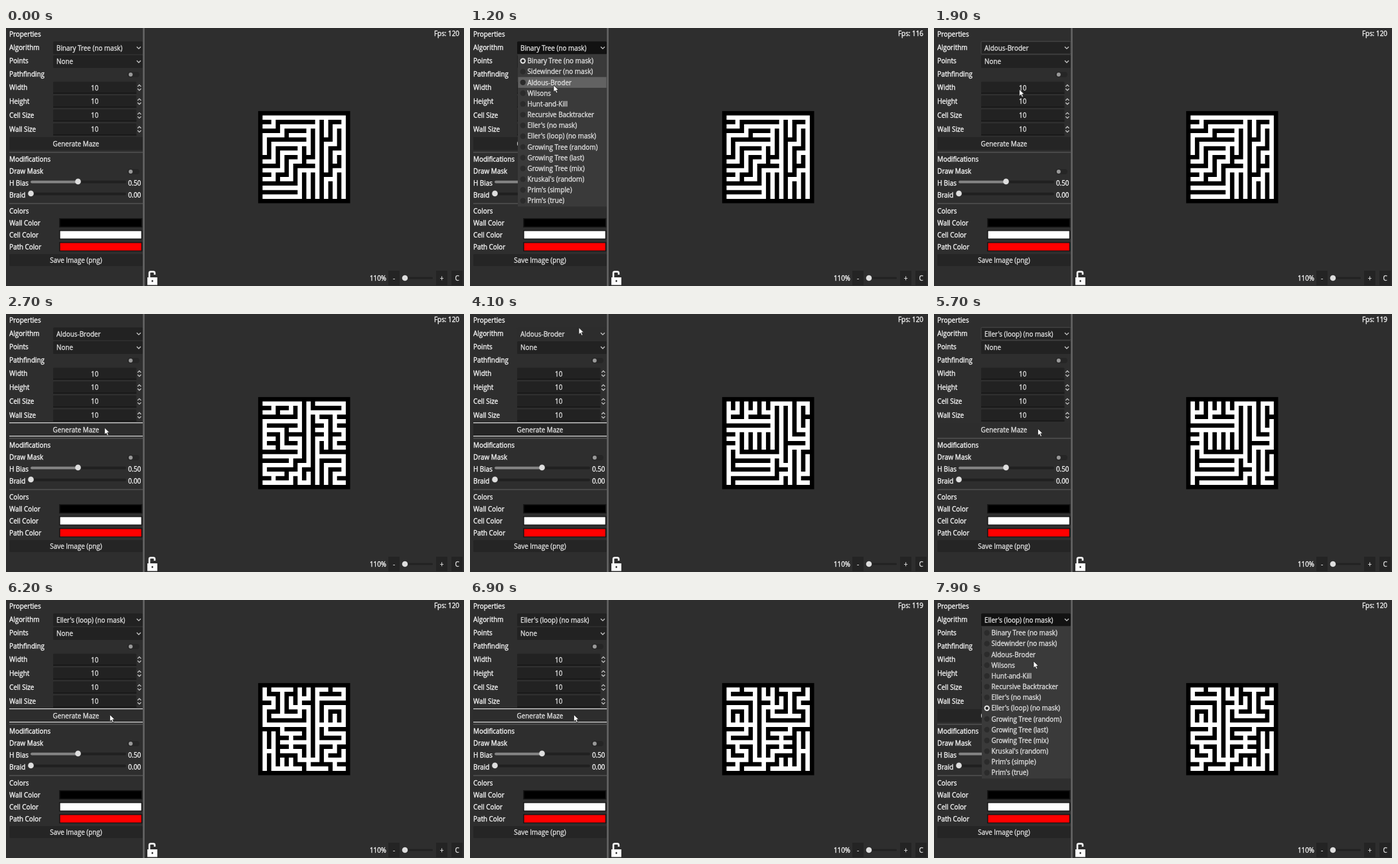
Recreate the animation shown at these times as an HTML page. Size 690 px wide and 388 px high, loop 8 s.

```html
<!DOCTYPE html>
<html lang="en">
<head>
<meta charset="utf-8">
<title>Maze generator</title>
<style>
  html, body { margin: 0; width: 100%; height: 100%; overflow: hidden; background: #2e2e2e; }
  svg { display: block; width: 100vw; height: 100vh; }
  text { font: 400 9.9px "Open Sans", "Noto Sans", sans-serif; fill: #f6f6f6; stroke: #f6f6f6; stroke-width: .35; white-space: pre; }
  .control { fill: #dedede; stroke: #dedede; }
  .line { fill: none; stroke: #c4c4c4; stroke-width: 1.3; }
</style>
</head>
<body>
<svg id="stage" viewBox="0 0 690 388"></svg>
<script>
const stage = document.getElementById('stage');

function add(tag, attrs, parent = stage) {
  const node = document.createElementNS('http://www.w3.org/2000/svg', tag);
  for (const key in attrs) node.setAttribute(key, attrs[key]);
  parent.appendChild(node);
  return node;
}
const rect = (x, y, width, height, fill, parent, more) =>
  add('rect', { x, y, width, height, fill, ...more }, parent);
const dot = (cx, cy, r, fill, parent) => add('circle', { cx, cy, r, fill }, parent);
const path = (d, more, parent) => add('path', { d, ...more }, parent);

// y is the middle of the line of text
function label(x, y, content, anchor = 'start', parent) {
  const node = add('text', { x, y: y + 3.6, 'text-anchor': anchor }, parent);
  node.textContent = content;
  return node;
}
function controlLabel(...args) {
  const node = label(...args);
  node.setAttribute('class', 'control');
  return node;
}
const show = (node, on) => node.setAttribute('visibility', on ? 'visible' : 'hidden');

// Passages in cell coordinates
const mazes = {
  tree: `M0 0H9V9M0 1H1V0M2 1H6V0M7 1V0M8 1H9M0 2H2V1M3 2H5V1M6 2V1M7 2V1M8 2V1
    M0 3V2M1 3H5V2M6 3V2M7 3H8V2M0 4V3M1 4V3M2 4H4V3M5 4V3M6 4V3M7 4V3M8 4H9
    M0 5H1V4M2 5V4M3 5H4V4M5 5H6V4M7 5V4M8 5V4M0 6H2V5M3 6V5M4 6H6V5M7 6V5M8 6H9
    M0 7H1V6M2 7H3V6M4 7V6M5 9V6M6 9V6M7 7H8V6M0 8H4V7M7 9V7M8 9V7M0 9H4V8`,
  walk: `M0 0H4V3M0 1H1V0M2 1H3V0M4 2H0V3H2M5 0V7M6 0H9V1M5 1H9M6 1V2H7V4H6V9M6 3H7
    M8 1V3H9V4M9 2H8M3 3H4M0 3V5H1M0 4H1M2 3V5H4V4H3M9 4H8V5H9M7 4V5
    M0 6H4V5M6 6H9V7H7V9M0 7H3V6M5 7H4V9H5V8M0 7V8H2M4 8H3V9H0M1 9V8M9 7V8H8V9H9`,
  walk2: `M0 0V2H5V0H7V4H9V2M0 1H1V0M2 0V2M2 1H3V0M4 0V1H5M9 1V0H8V3H9M6 0V7H7
    M0 3H5V2M3 3V5M0 4H1V3M2 3V5M4 3V5M5 3V5M0 5H1V6H6M1 4V5M9 4V5H7V9
    M0 5V9M8 5V9H9M9 6V8H8M1 7H5V6M0 8H5V7M6 8H7M1 9H6V8`,
  loop: `M1 0H0V1H3V0H2M4 0V1H5V3H8M5 2H4V7M5 0V1M6 0H8M9 0V1H8V2H9V4H4M7 0V3M6 1V2H5
    M0 4V2H2V4M1 3V4M0 4H3M3 1V8H4V7M0 6V5H2V4M5 5H7V4M4 6H7M5 8V7H7M6 5V7
    M8 5V9M9 5V9M8 7H9M0 6H3M0 7V8H2V7H1V6M5 8H4V9H2M5 9H8M6 9V8M7 9V8M0 9H1V8`
};

const algorithms = ['Binary Tree (no mask)', 'Sidewinder (no mask)', 'Aldous-Broder', 'Wilsons',
  'Hunt-and-Kill', 'Recursive Backtracker', "Eller's (no mask)", "Eller's (loop) (no mask)",
  'Growing Tree (random)', 'Growing Tree (last)', 'Growing Tree (mix)', "Kruskal's (random)",
  "Prim's (simple)", "Prim's (true)"];

// Maze view
rect(0, 0, 690, 388, '#2e2e2e');
rect(379.9, 124.9, 138.6, 138.6, '#000');
const maze = path('', { fill: 'none', stroke: '#fff', 'stroke-width': .5, 'stroke-linecap': 'square' });
const fps = label(683, 8, '', 'end');

// Zoom bar and lock
label(573, 376, '110%', 'end');
[[576, '-'], [648, '+'], [671, 'C']].forEach(([x, sign]) => {
  rect(x, 365, 17, 22, '#242424');
  controlLabel(x + 8.5, 376, sign, 'middle');
});
rect(597, 374.5, 46, 3, '#222', stage, { rx: 1.5 });
dot(601, 376, 4.3, '#dedede');
rect(213, 375, 15, 11.5, '#fff');
path('M216 376V368.5Q216 366.5 218 366.5H222Q224 366.5 224 368.5V371', { fill: 'none', stroke: '#fff', 'stroke-width': 2.6 });
rect(219.5, 379, 2, 3, '#2e2e2e');

// Side panel
rect(206.2, 0, 2.6, 388, '#646464');
[['Properties', 9.5], ['Algorithm', 29], ['Points', 49.5], ['Pathfinding', 69.5], ['Width', 89.5],
 ['Height', 110.5], ['Cell Size', 131], ['Wall Size', 152], ['Modifications', 197.5],
 ['Draw Mask', 215.5], ['H Bias', 233.5], ['Braid', 251.5], ['Colors', 275], ['Wall Color', 293],
 ['Cell Color', 311], ['Path Color', 329]].forEach(([name, y]) => label(5, y, name));

function dropdown(y, value) {
  const box = rect(71, y - 9.5, 135, 19, '#222', stage, { rx: 1.5 });
  path(`M197 ${y - 1.5}l3 3 3-3`, { class: 'line' });
  return { box, text: controlLabel(76, y + .3, value) };
}
const picker = dropdown(29.7, '');
dropdown(50.5, 'None');

for (const y of [89.7, 110.6, 131.5, 152.4]) {
  rect(71, y - 9, 125.5, 18, '#222', stage, { rx: 1.5 });
  rect(71, y + 7.8, 125.5, 1.2, '#131313');
  controlLabel(133.7, y + .2, '10', 'middle');
  path(`M198.3 ${y - 1.6}l2.6-2.6 2.6 2.6M198.3 ${y + 1.6}l2.6 2.6 2.6-2.6`, { class: 'line' });
}
for (const y of [70, 216]) {
  rect(183, y - 4, 18, 8, '#262626', stage, { rx: 4 });
  dot(187.8, y, 3, '#999');
}
for (const [y, knob, value] of [[230.9, 108.5, '0.50'], [248.9, 37.5, '0.00']]) {
  rect(37, y - 1.5, 144, 4, '#202020', stage, { rx: 2 });
  rect(37, y - 1.5, knob - 37, 4, '#858585', stage, { rx: 2 });
  dot(knob, y, 4.3, '#dedede');
  label(203.5, y + 2.6, value, 'end');
}
for (const y of [187, 264]) rect(5, y - .5, 201, 1, '#626262');
for (const [y, color] of [[293, '#000'], [311, '#fff'], [329, '#f00']]) {
  rect(80, y - 7, 125.5, 14, '#171717');
  rect(81.6, y - 5.6, 122.2, 11.2, color);
}
rect(5, 340, 201, 18, '#252525', stage, { rx: 1.5 });
controlLabel(105.5, 349.3, 'Save Image (png)', 'middle');
const button = rect(5, 164, 201, 19.5, '#252525');
const buttonFocus = path('M5 163.6H206M5 183.6H206', { stroke: '#d4d4d4', 'stroke-width': 1.2 });
controlLabel(105.5, 174, 'Generate Maze', 'middle');

// Popup list
const popup = add('g', {});
const itemTop = 41.4, itemStep = 16.17;
rect(72, 39.5, 134, 229, '#3a3a3a', popup);
const hoverRow = rect(72.5, 0, 133, 16.2, '#626262', popup);
algorithms.forEach((name, i) => {
  const y = itemTop + itemStep * (i + .5);
  dot(79.7, y, 4.2, '#2b2b2b', popup);
  controlLabel(86.5, y + .2, name, 'start', popup);
});
const radio = add('g', {}, popup);
dot(79.7, 0, 4.2, '#e8e8e8', radio);
dot(79.7, 0, 2.2, '#252525', radio);

const cursor = path('M0 0V10.2L2.4 8 4.1 11.8 5.9 11 4.2 7.3H7.4Z',
  { fill: '#fff', stroke: '#1b1b1b', 'stroke-width': .7 });

// Time in ms, then the values from that time on
const pointer = [[500, 300, 84], [800, 165, 27], [1000, 162, 28], [1200, 126, 86], [1300, 126, 87],
  [1400, 126, 94], [1600, 126, 86], [1800, 127, 86], [2400, 148.5, 171], [3100, 148.5, 171],
  [3800, 163, 24], [4100, 164, 20.5], [4300, 164, 26], [4900, 150, 162], [5200, 150, 162],
  [5500, 156.5, 172.5], [6900, 156.5, 172.5], [7400, 158, 26], [7600, 146, 82], [7700, 146, 82],
  [7900, 150, 92]];
const fpsSteps = [[0, 120], [800, 116], [1800, 120], [4800, 119], [5800, 120], [6800, 119], [7800, 120]];
const choiceSteps = [[0, 0], [1800, 2], [5200, 7]];
const popupSteps = [[0, false], [1000, true], [1800, false], [4300, true], [5200, false], [7500, true]];
const focusSteps = [[0, ''], [1000, 'picker'], [2600, 'button'], [4300, 'picker'], [5800, 'button'], [7500, 'picker']];
const pressSteps = [[0, false], [2600, true], [2700, false], [3000, true], [3100, false],
  [5800, true], [5900, false], [6500, true], [6600, false]];
const mazeSteps = [[0, 'tree'], [2700, 'walk'], [3100, 'walk2'], [5900, 'loop', -1], [6600, 'loop']];

const at = (steps, t) => steps.findLast(step => step[0] <= t);

function pointerAt(t) {
  const next = pointer.findIndex(step => step[0] > t);
  if (next < 0) return pointer.at(-1).slice(1);
  const [t0, x0, y0] = pointer[Math.max(next - 1, 0)], [t1, x1, y1] = pointer[next];
  const part = t1 > t0 ? Math.max(0, (t - t0) / (t1 - t0)) : 0;
  const ease = part * part * (3 - 2 * part);
  return [x0 + (x1 - x0) * ease, y0 + (y1 - y0) * ease];
}

function draw(t) {
  const [x, y] = pointerAt(t);
  const visible = t >= pointer[0][0];
  const open = at(popupSteps, t)[1], focus = at(focusSteps, t)[1], choice = at(choiceSteps, t)[1];
  const over = (top, bottom) => visible && !open && x > 5 && x < 206 && y > top && y < bottom;

  show(cursor, visible);
  cursor.setAttribute('transform', `translate(${x} ${y})`);
  fps.textContent = `Fps: ${at(fpsSteps, t)[1]}`;

  const pickerHover = x > 71 && over(20, 39);
  picker.text.textContent = algorithms[choice];
  picker.box.setAttribute('fill', open ? '#121212' : pickerHover ? '#2d2d2d' : '#222');
  picker.box.setAttribute('stroke', focus === 'picker' && !open ? '#4a4a4a' : 'none');
  const pressed = at(pressSteps, t)[1];
  button.setAttribute('fill', pressed ? '#151515' : over(164, 183) ? '#2d2d2d' : '#252525');
  show(buttonFocus, focus === 'button');

  show(popup, open);
  radio.setAttribute('transform', `translate(0 ${itemTop + itemStep * (choice + .5)})`);
  const row = Math.floor((y - itemTop) / itemStep);
  hoverRow.setAttribute('y', itemTop + itemStep * row);
  show(hoverRow, open && row >= 0 && t < 7400);

  const [, name, flip = 1] = at(mazeSteps, t);
  maze.setAttribute('d', mazes[name]);
  maze.setAttribute('transform', `translate(449.2 194.2) scale(${13.2 * flip} 13.2) translate(-4.5 -4.5)`);
}

const start = performance.now();
function tick() {
  const t = (performance.now() - start) % 8000;
  draw(Math.floor(t / 100) * 100);
  requestAnimationFrame(tick);
}
tick();
</script>
</body>
</html>
```
